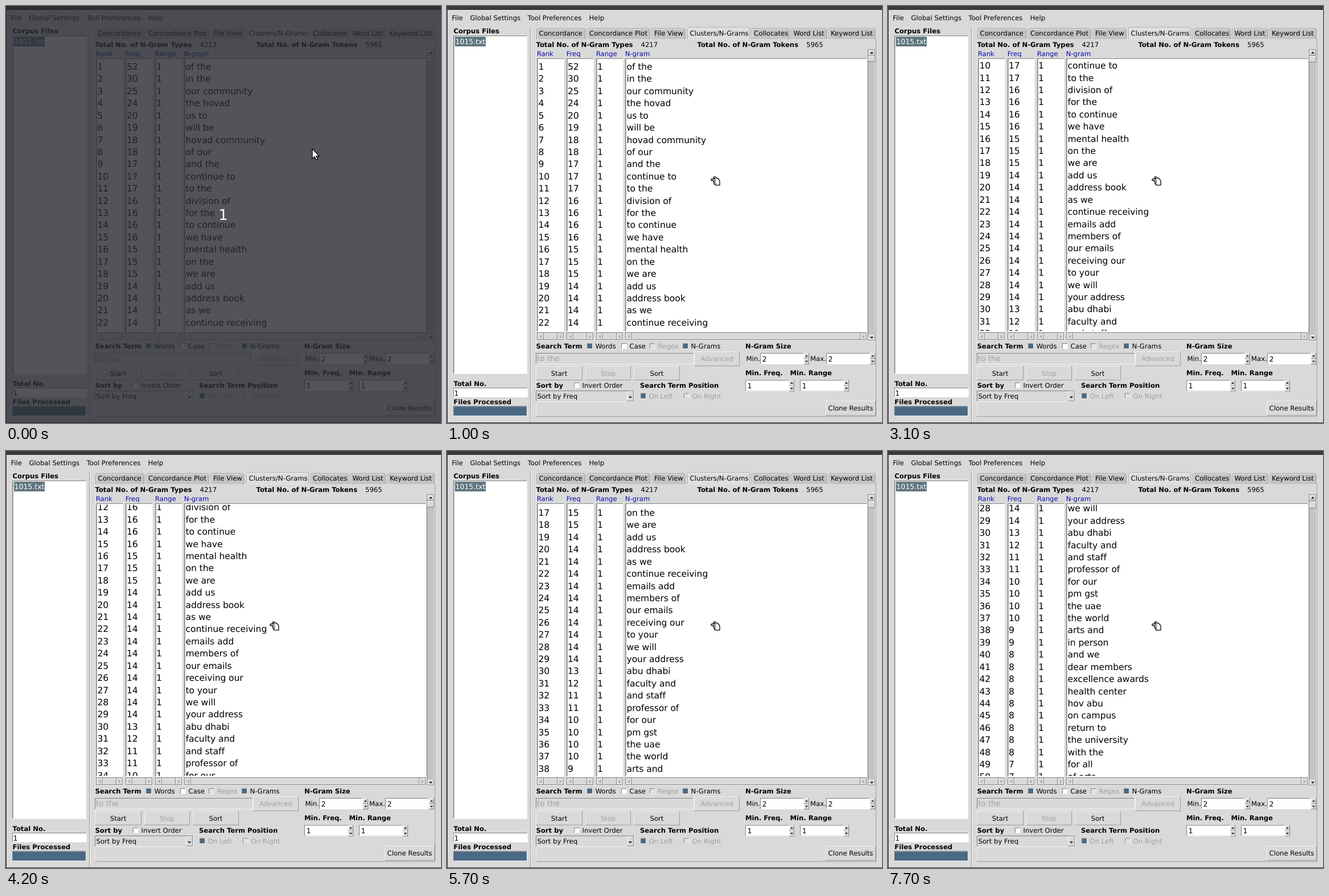
These frames come from a looping animation (764 px wide and 733 px high, 8000 ms). An HTML page:

```html
<!DOCTYPE html>
<html lang="en">
<head>
<meta charset="utf-8">
<title>N-gram list</title>
<style>
html, body { margin: 0; width: 100%; height: 100%; overflow: hidden; background: #d9d9d9; }
svg { display: block; width: 764px; height: 733px; }
text {
  font-family: "DejaVu Sans", sans-serif;
  font-size: 11.66px;
  text-rendering: geometricPrecision;
  white-space: pre;
}
.bold { font-weight: bold; font-size: 11.62px; }
.off { fill: #a0a0a0; }
.head { fill: #0c0cb4; }
.field { font-size: 12.5px; }
.row { font-size: 15.57px; letter-spacing: -.07px; }
</style>
</head>
<body>
<svg id="stage" viewBox="0 0 764 733"></svg>
<script>
const LOOP = 8000;
const BG = '#d9d9d9', TROUGH = '#c3c3c3', DARK = '#828282', LIGHT = '#f4f4f4', BLUE = '#4a6984';
const PITCH = 21.42, WHEEL = 48.67;

const words = `of the|in the|our community|the hovad|us to|will be|hovad community|of our|and the
continue to|to the|division of|for the|to continue|we have|mental health|on the|we are|add us
address book|as we|continue receiving|emails add|members of|our emails|receiving our|to your
we will|your address|abu dhabi|faculty and|and staff|professor of|for our|pm gst|the uae|the world
arts and|in person|and we|dear members|excellence awards|health center|hov abu|on campus|return to
the university|with the|for all|of arts`.split(/[|\n]/);

// Pairs of frequency and how many rows share it
const freqs = [[52, 1], [30, 1], [25, 1], [24, 1], [20, 1], [19, 1], [18, 2], [17, 3], [16, 4], [15, 3],
  [14, 11], [13, 1], [12, 1], [11, 2], [10, 4], [9, 2], [8, 9], [7, 2]]
  .flatMap(([value, count]) => Array(count).fill(value));

const rect = (x, y, w, h, fill, extra = '') =>
  `<rect x="${x}" y="${y}" width="${w}" height="${h}" fill="${fill}" ${extra}/>`;
const path = (d, fill, extra = '') => `<path d="${d}" fill="${fill}" ${extra}/>`;
const label = (x, y, s, cls = '', extra = '') => `<text x="${x}" y="${y}" class="${cls}" ${extra}>${s}</text>`;

// Box with a one pixel bevel
const bevel = (x, y, w, h, fill, top, bottom) =>
  rect(x, y, w, h, bottom) + rect(x, y, w - 1, h - 1, top) + rect(x + 1, y + 1, w - 2, h - 2, fill);
const sunk = (x, y, w, h, fill) => bevel(x, y, w, h, fill, DARK, LIGHT);
const raised = (x, y, w, h, fill = BG) => bevel(x, y, w, h, fill, LIGHT, DARK);

const arrow = (cx, cy, dir, size = 3, fill = '#000') =>
  `<path d="M${-size} ${size / 2}H${size}L0 ${-size / 2}Z" fill="${fill}" transform="translate(${cx} ${cy}) rotate(${dir})"/>`;

function button(x, y, w, h, s, cls = '') {
  return bevel(x, y, w, h, BG, '#f0f0f0', '#9c9c9c') +
    label(x + w / 2, y + h / 2 + 4, s, cls, 'text-anchor="middle"');
}

function check(x, y, s, on, cls = '') {
  const box = bevel(x, y, 10, 10, on ? BLUE : cls ? '#e2e2e2' : '#fff', DARK, '#ededed');
  return box + label(x + 14.5, y + 9, s, cls);
}

function spin(x, y, s) {
  let out = sunk(x, y, 77, 20, '#fff') + label(x + 3.5, y + 14.5, s, 'field');
  for (const [dy, dir] of [[0, 0], [10, 180]])
    out += raised(x + 77, y + dy, 9, 10) + arrow(x + 81.5, y + dy + 5, dir, 2.5);
  return out;
}

function hScroll(x, w) {
  return rect(x, 574, w, 14, TROUGH) + sunk(x, 574, w, 14, TROUGH) +
    raised(x + 1, 575, 11, 12) + raised(x + 12, 575, w - 24, 12) + raised(x + w - 12, 575, 11, 12) +
    arrow(x + 6.5, 581, -90, 3, '#a3a3a3') + arrow(x + w - 6.5, 581, 90, 3, '#a3a3a3');
}

function tab(x, w, s, active) {
  const y = active ? 37 : 39;
  const d = `M${x + .5} 58.5V${y + 2.5}l2 -2H${x + w - 2.5}l2 2V58.5`;
  return path(d, active ? '#dedede' : TROUGH, `stroke="${active ? '#aaa' : '#9a9a9a'}"`) +
    path(`M${x + 1.5} 58V${y + 3}l1.5 -1.5H${x + w - 3}`, 'none', 'stroke="#efefef"') +
    label(x + 4.5, 52, s);
}

function windowFrame() {
  let out = rect(0, 0, 764, 733, BG) + rect(0, 0, 764, 7, '#3c3b37') + rect(0, 7, 1, 726, '#2d1826') +
    rect(1, 7, 763, 1, '#f0f0f0') + rect(0, 732, 764, 1, '#3a2434');
  [[9, 'File'], [41, 'Global Settings'], [142, 'Tool Preferences'], [250, 'Help']]
    .forEach(([x, s]) => out += label(x - .5, 25, s));
  return out;
}

function sidePanel() {
  return rect(146, 37, 1, 695, '#9a9a9a') + rect(147, 37, 1, 695, '#f2f2f2') +
    label(11.5, 48, 'Corpus Files', 'bold') +
    sunk(11, 52, 130, 595, '#fffffe') + rect(12, 53, 1, 592, '#b0b0b0') +
    rect(14, 54, 54, 17, '#607580') + label(14.5, 67, '1015.txt', 'field', 'fill="#fff"') +
    label(11.5, 668, 'Total No.', 'bold') + sunk(11, 671, 131, 17, '#fff') + label(12.5, 684.5, '1', 'field') +
    label(11.5, 699.5, 'Files Processed', 'bold') + sunk(11, 703, 130, 18, BLUE) +
    rect(12, 704, 128, 1, '#6d8aa3');
}

function notebook() {
  const tabs = [[157, 86, 'Concordance'], [245.5, 111, 'Concordance Plot'], [359.5, 59, 'File View'],
    [422, 110, 'Clusters/N-Grams'], [534.5, 67, 'Collocates'], [604, 63, 'Word List'], [669.5, 83, 'Keyword List']];
  let out = path('M156.5 721V58.5H753', 'none', 'stroke="#ededed"') +
    path('M156 721.5H753.5V58', 'none', 'stroke="#9c9c9c"');
  tabs.forEach(([x, w, s], i) => out += tab(x, w, s, i === 3));
  out += label(156.5, 72, 'Total No. of N-Gram Types', 'bold') + label(340.5, 72, '4217') +
    label(439.5, 72, 'Total No. of N-Gram Tokens', 'bold') + label(631, 72, '5965');
  const cols = [[157, 49, 'Rank'], [209, 49, 'Freq'], [261, 49, 'Range'], [312, 426, 'N-gram']];
  for (const [x, w, s] of cols)
    out += label(x + .7, 88, s, 'head') + sunk(x + 1, 92, w - 1, 481, '#fffffe') +
      rect(x + 2, 93, 1, 478, '#b4b4b4') + hScroll(x + 1, w - 1);
  return out;
}

function vScroll() {
  return sunk(739, 76, 14, 513, TROUGH) + raised(740, 77, 12, 10) + arrow(746, 82, 0) +
    raised(740, 578, 12, 10) + arrow(746, 583, 180) + '<g id="thumb"></g>';
}

function controls() {
  return label(156.5, 602, 'Search Term', 'bold') +
    check(246, 593, 'Words', true) + check(306, 593, 'Case') +
    check(356, 593, 'Regex', false, 'off') + check(414, 593, 'N-Grams', true) +
    label(524, 602, 'N-Gram Size', 'bold') +
    sunk(156, 610, 278, 20, BG) + label(158, 624, 'to the', 'off', 'style="font-size:13.4px"') +
    button(434, 607, 80, 26, 'Advanced', 'off') +
    label(525.5, 624, 'Min.') + spin(550, 610, '2') + label(638, 624, 'Max.') + spin(666, 610, '2') +
    button(156, 633, 82, 25, 'Start') + button(243, 633, 80, 25, 'Stop', 'off') + button(328, 633, 81, 25, 'Sort') +
    label(524, 649, 'Min. Freq.', 'bold') + label(602.5, 649, 'Min. Range', 'bold') +
    spin(524, 657.5, '1') + spin(620, 657.5, '1') +
    label(156.5, 671, 'Sort by', 'bold') + check(223, 662, 'Invert Order') +
    label(339, 671, 'Search Term Position', 'bold') +
    sunk(156, 676, 173, 20, BG) + label(158.5, 690, 'Sort by Freq') +
    raised(316, 677, 12, 18) + arrow(322, 688, 180) +
    check(340, 680.5, 'On Left', true, 'off') + check(416, 680.5, 'On Right', false, 'off') +
    button(665, 694, 88, 26, 'Clone Results');
}

function rows() {
  const lines = words.map((s, i) => {
    const y = (112 + i * PITCH).toFixed(2);
    return [[160.5, i + 1], [212, freqs[i]], [264, 1], [315.5, s]].map(([x, v]) => label(x, y, v, 'row')).join('');
  });
  return `<clipPath id="view">${rect(157, 94.5, 580, 476.5, '#000')}</clipPath>` +
    `<g clip-path="url(#view)"><g id="rows">${lines.join('')}</g></g>`;
}

const hand = '<g id="hand">' + path(
  'M2.2 5H8.3L5.3 2.9Q4.9 .8 7 1.1L13 4.6Q15.8 6.3 16 9V15.8H8.5Q6.6 15.6 6.8 13.4Q5.2 12.6 5.8 10.8Q4.6 9.6 5.4 8H2.2Q.8 7.8 .8 6.5T2.2 5Z',
  '#fff', 'stroke="#000" stroke-width="1.3" stroke-linejoin="round"') +
  path('M6 8H9.5M6.3 10.7H9.5M7 13.3H9.5', 'none', 'stroke="#000" stroke-width="1"') + '</g>';

const countdown = '<g id="countdown">' + rect(0, 0, 764, 733, 'rgb(39,42,48)', 'fill-opacity=".8"') +
  label(381.5, 376, '1', '', 'fill="#fff" text-anchor="middle" style="font-size:26px"') +
  path('M538 251V268.5L542 264.8L544.6 270.6L547.2 269.4L544.7 263.8H550Z', '#fff',
    'stroke="#000" stroke-width="1.2" stroke-linejoin="round"') + '</g>';

document.getElementById('stage').innerHTML =
  windowFrame() + sidePanel() + notebook() + vScroll() + controls() + rows() + hand + countdown;

const [rowsEl, thumbEl, handEl, countEl] = ['rows', 'thumb', 'hand', 'countdown'].map(id => document.getElementById(id));

// Times at which one or two wheel clicks arrive
const clicks = [1700, 1800, 2900, 3100, 4200, 4500, 5700, 6200, 7200, 7200, 7600, 7700];

function handAt(t) {
  if (t >= 1000) return [463, 299];
  const k = Math.max(0, Math.min(3, Math.floor(t / 100) - 1)) / 3;
  return [Math.round(533 - 54 * k), Math.round(254 - 40 * k)];
}

function draw(t) {
  const n = clicks.filter(c => t >= c).length;
  rowsEl.setAttribute('transform', `translate(0 ${(-n * WHEEL).toFixed(2)})`);
  const top = 87 + Math.floor(n / 4), bottom = 98 + Math.floor((n + 2) / 4);
  thumbEl.innerHTML = raised(740, top, 12, bottom - top);
  handEl.setAttribute('transform', `translate(${handAt(t)})`);
  countEl.style.display = t < 100 ? '' : 'none';
  handEl.style.display = t < 100 ? 'none' : '';
}

let start;
function tick(now) {
  start ??= now;
  draw((now - start) % LOOP);
  requestAnimationFrame(tick);
}
draw(0);
requestAnimationFrame(tick);
</script>
</body>
</html>
```
